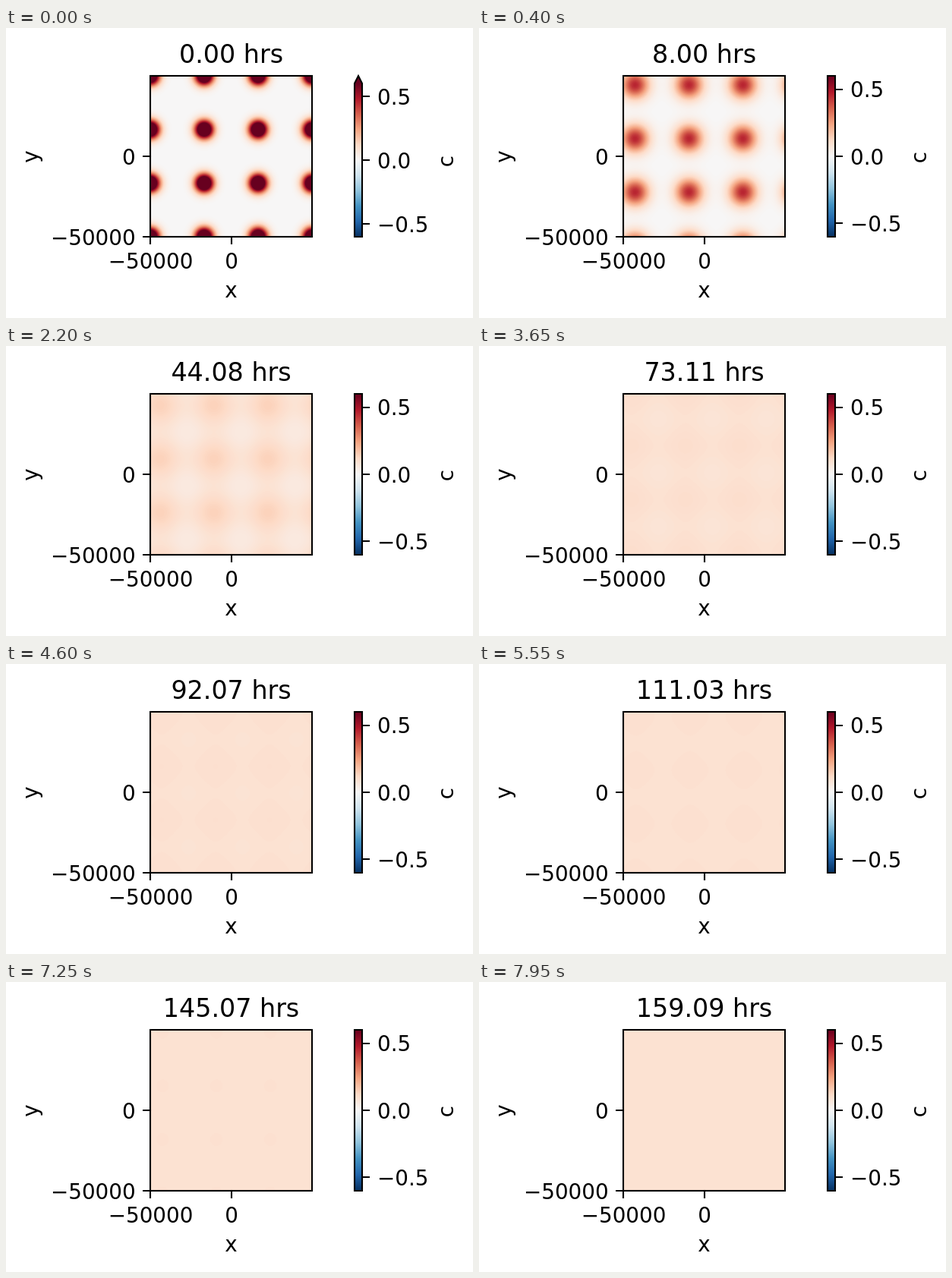
Animation, 615 px wide and 382 px high, one loop 8000 ms. Source, as an HTML page with a canvas:

```html
<!DOCTYPE html>
<html lang="en">
<head>
<meta charset="utf-8">
<title>Tracer diffusion</title>
<style>
html, body { margin: 0; width: 100%; height: 100%; overflow: hidden; background: #fff; }
canvas, svg { position: absolute; left: 0; top: 0; display: block; }
canvas { left: 190px; top: 63px; }
text { font-family: "DejaVu Sans", sans-serif; font-size: 27.78px; }
#title { font-size: 33.33px; }
.line { fill: none; stroke: #000; stroke-width: 2.1; }
.mid { text-anchor: middle; }
.end { text-anchor: end; }
</style>
</head>
<body>
<canvas id="field" width="213" height="212"></canvas>
<svg width="615" height="382" viewBox="0 0 615 382">
  <defs><linearGradient id="ramp" x1="0" y1="1" x2="0" y2="0"></linearGradient></defs>
  <text id="title" class="mid" x="296.5" y="46"></text>
  <rect class="line" x="190" y="63" width="213" height="212"/>
  <path class="line" d="M190 275V285M297 275V285M190 275H180M190 169H180"/>
  <text class="mid" x="190.5" y="316.5">−50000</text>
  <text class="mid" x="297" y="316.5">0</text>
  <text class="end" x="170.6" y="179.7">0</text>
  <text class="end" x="170.6" y="285.7">−50000</text>
  <text class="mid" x="296.5" y="355">x</text>
  <text class="mid" transform="translate(42.2 169.5) rotate(-90)">y</text>
  <path id="tip" fill="#67001f"/>
  <rect id="bar" x="459" width="10" fill="url(#ramp)"/>
  <path id="edge" class="line"/>
  <path id="ticks" class="line"/>
  <text id="hi" x="489">0.5</text>
  <text id="zero" x="489">0.0</text>
  <text id="lo" x="489">−0.5</text>
  <text id="unit" class="mid">c</text>
</svg>
<script>
const $ = id => document.getElementById(id);
const set = (id, attrs) => { for (const k in attrs) $(id).setAttribute(k, attrs[k]); };

const W = 213, H = 212, LIMIT = 0.6, BOTTOM = 275;
const FRAME = 50, LOOP = 8000;
const stops = ['053061', '2166ac', '4393c3', '92c5de', 'd1e5f0', 'f7f7f7',
               'fddbc7', 'f4a582', 'd6604d', 'b2182b', '67001f'];
const rgb = stops.map(s => [0, 2, 4].map(i => parseInt(s.slice(i, i + 2), 16)));

$('ramp').innerHTML = stops.map((s, i) =>
  `<stop offset="${i / 10}" stop-color="#${s}"/>`).join('');

// 256-level diverging palette
const palette = Array.from({ length: 256 }, (_, i) => {
  const p = i / 255 * 10, k = Math.min(9, Math.floor(p));
  return rgb[k].map((v, j) => Math.round(v + (rgb[k + 1][j] - v) * (p - k)));
});

const ctx = $('field').getContext('2d');
const img = ctx.createImageData(W, H);

// Output step and hours by which the model clock runs past it
const lag = [[0, 0], [18, 0], [44, 0.08], [73, 0.11], [111, 0.03], [145, 0.07], [159, 0.09]];

function hoursAt(n) {
  const i = Math.max(1, lag.findIndex(p => p[0] >= n));
  const [a, va] = lag[i - 1], [b, vb] = lag[i];
  return n + va + (vb - va) * (n - a) / (b - a);
}

// Periodic row of spreading Gaussians along one axis
function profile(size, shift, variance) {
  const period = size / 3, amp = Math.sqrt(74.5 / variance);
  return Float64Array.from({ length: size }, (_, i) => {
    let d = (i + 0.5 - shift) / period;
    d = (d - Math.round(d)) * period;
    let sum = 0;
    for (let k = -4; k <= 4; k++) sum += Math.exp(-((d + k * period) ** 2) / (2 * variance));
    return amp * sum;
  });
}

function drawField(hours, variance) {
  // Inertial circle, f = 1e-4 per second
  const angle = 0.36 * hours - 0.75 * Math.PI;
  const gx = profile(W, 7 + 9.9 * Math.cos(angle), variance);
  const gy = profile(H, 7 + 9.9 * Math.sin(angle), variance);
  for (let y = 0, p = 0; y < H; y++) {
    for (let x = 0; x < W; x++, p += 4) {
      const level = Math.floor((gx[x] * gy[y] + LIMIT) / (2 * LIMIT) * 256);
      const c = palette[Math.min(255, level)];
      img.data[p] = c[0];
      img.data[p + 1] = c[1];
      img.data[p + 2] = c[2];
      img.data[p + 3] = 255;
    }
  }
  ctx.putImageData(img, 0, 0);
}

function drawBar(extended) {
  const top = extended ? 73 : 63, h = BOTTOM - top, mid = top + h / 2;
  const ys = [-1, 0, 1].map(s => mid + s * h * 0.5 / (2 * LIMIT));
  const cap = extended ? `L464 63L469 ${top}` : 'H469';
  set('bar', { y: top, height: h });
  set('tip', { d: extended ? `M459 ${top + 1}V${top}L464 63L469 ${top}V${top + 1}Z` : '' });
  set('edge', { d: `M459 ${BOTTOM}V${top}${cap}V${BOTTOM}Z` });
  set('ticks', { d: ys.map(y => `M469 ${Math.round(y)}H479`).join('') });
  ['hi', 'zero', 'lo'].forEach((id, i) => set(id, { y: ys[i] + 10.7 }));
  set('unit', { transform: `translate(588.8 ${mid + 1.5}) rotate(-90)` });
}

function render(ms) {
  const n = Math.floor(ms % LOOP / FRAME);
  if (n === render.last) return;
  render.last = n;
  const hours = hoursAt(n), variance = 74.5 + 11 * hours;
  $('title').textContent = hours.toFixed(2) + ' hrs';
  drawField(hours, variance);
  drawBar(74.5 / variance > LIMIT);
}

const start = performance.now();
function tick() {
  render(performance.now() - start);
  requestAnimationFrame(tick);
}
tick();
</script>
</body>
</html>
```
